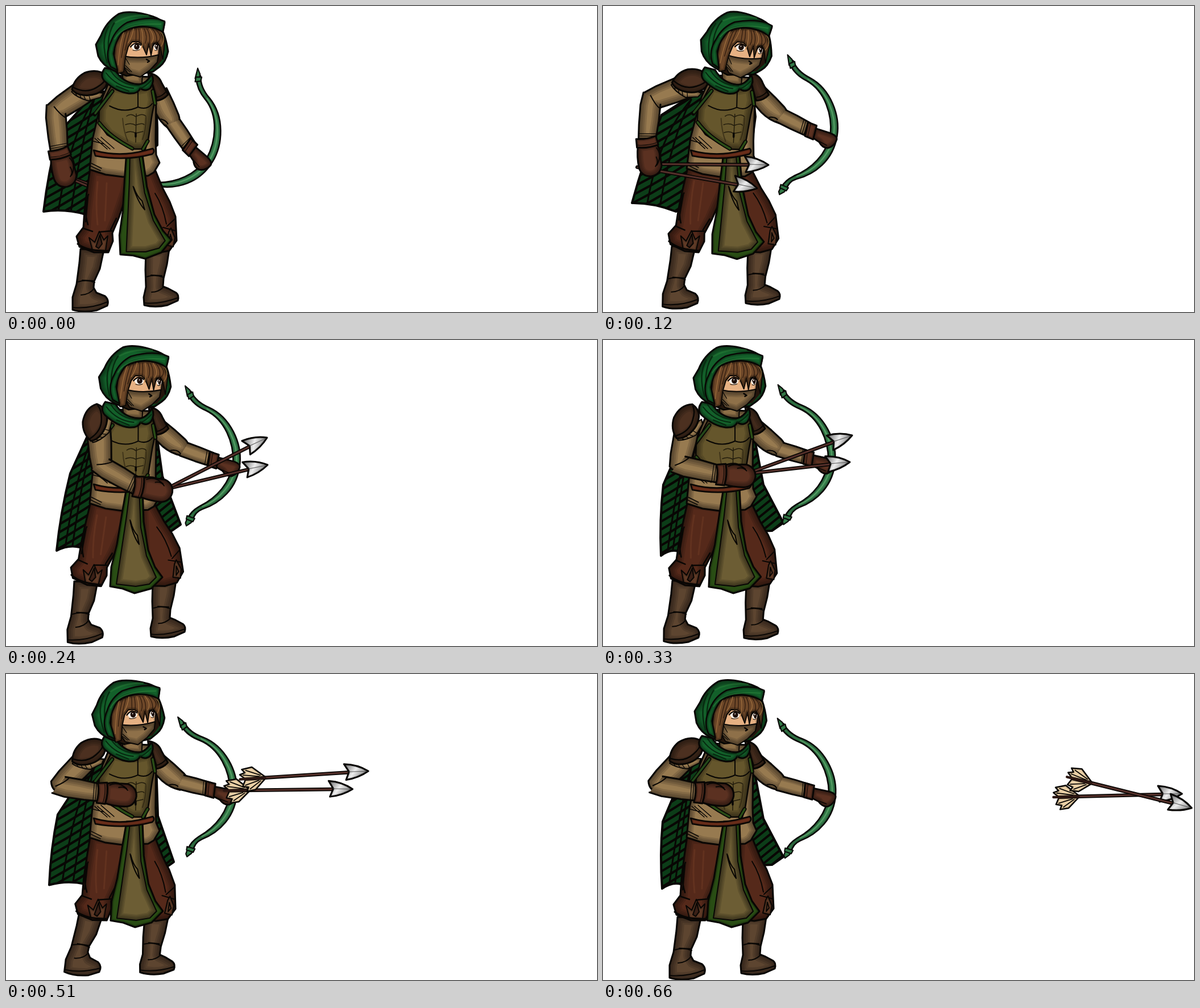
These frames come from a looping animation (1039 px wide and 539 px high, 0.9 s). An HTML page with a canvas:

```html
<!DOCTYPE html>
<html lang="en">
<head>
<meta charset="utf-8">
<title>Archer</title>
<style>
html, body { margin: 0; width: 100%; height: 100%; overflow: hidden; background: #fff; }
canvas { display: block; }
</style>
</head>
<body>
<canvas id="stage" width="1039" height="539"></canvas>
<script>
const ctx = document.getElementById('stage').getContext('2d');
const LOOP = 900, STEP = 30, LAST = 660;
const TAN = '#977a50', PANTS = '#55291a', BOOT = '#5d4530', GLOVE = '#5b3121', PAD = '#4c3020';
const GREEN = '#13602a', OLIVE = '#65562c', BROWN = '#6d4728';
const rad = Math.PI / 180;
const cache = {};
const path = d => cache[d] || (cache[d] = new Path2D(d));

// time, head angle, head x, left knee, left foot, right knee, right foot,
// tabard angle, bow angle, grip x, grip y, elbow x, elbow y, lean
const BODY = [
  [0, 0, 0, 0, 0, 0, 0, -6, 30, 357, 277, 294, 206, 0],
  [120, 7.5, 6, -10, -12, 9, 8, -3, 7.5, 407, 233, 314, 194, 1.6],
  [240, 2.3, 3, -11, -9, 12, 12, 0, 3.7, 407, 222, 314, 193, 0.2],
  [330, 1, 0, -9, -10, 6, 5, -1, 1.9, 404, 217, 312, 193, 0],
  [450, 0, -1, -5, -14, 0, -5, -0.8, 0.9, 402, 213, 308, 191, 0],
  [570, -5.5, -7, 0, -12, -4, -9, 0.2, 0, 402, 210, 308, 190, -0.2],
  [660, 2, 1, 0, 0, 0, 0, 0, 1.1, 405, 215, 312, 193, 0]
];
// time, shoulder x, y, upper arm, forearm and glove angles
const ARM = [
  [0, 147, 145, 146, 85, 75], [60, 150, 142, 162, 109, 98], [120, 152, 140, 159, 96, 81],
  [240, 163, 150, 86, 30, 8], [330, 150, 150, 102, 13, 2], [450, 147, 145, 135, 10, 4],
  [570, 146, 147, 135, 10, 4], [660, 147, 145, 135, 10, 4]
];
// time, then tip x, tip y, angle for both arrows
const ARROWS = [
  [0, 278, 374, 23, 284, 361, 19], [60, 258, 300, 10, 246, 340, 17], [120, 291, 280, 0.5, 271, 321, 10],
  [240, 459, 172, -27, 460, 220, -13.4], [330, 438, 168, -20, 434, 215, -6.5],
  [450, 407, 167, -13, 400, 212, 0], [540, 752, 173, 1, 714, 198, -1],
  [570, 845, 177, 4.5, 808, 194, -1.5], [660, 1035, 236, 14, 1018, 211, -1.5]
];
// time, then left bulge, left corner, hem, right bulge, right corner
const CAPE = [
  [0, 92, 225, 66, 362, 140, 367, 266, 215, 266, 245],
  [60, 85, 212, 47, 352, 132, 364, 267, 205, 264, 243],
  [120, 103, 192, 51, 347, 128, 362, 268, 195, 262, 240],
  [240, 113, 235, 89, 371, 130, 365, 275, 240, 307, 325],
  [330, 106, 255, 102, 380, 132, 372, 282, 255, 317, 322],
  [450, 92, 245, 79, 373, 137, 370, 268, 250, 298, 330],
  [570, 90, 250, 73, 370, 142, 370, 266, 250, 292, 332],
  [660, 105, 260, 104, 378, 137, 370, 282, 255, 317, 322]
];

function pose(rows, t) {
  let i = 1;
  while (i < rows.length - 1 && rows[i][0] < t) i++;
  const a = rows[i - 1], b = rows[i], u = (t - a[0]) / (b[0] - a[0]);
  return a.map((v, n) => v + (b[n] - v) * u).slice(1);
}

function at(x, y, deg, draw, px = 0, py = 0) {
  ctx.save();
  ctx.translate(x, y);
  ctx.rotate(deg * rad);
  ctx.translate(-px, -py);
  draw();
  ctx.restore();
}

// Filled shape with soft dark edges and an ink outline
function ink(d, fill, width = 3, depth = 26) {
  const p = typeof d === 'string' ? path(d) : d;
  ctx.fillStyle = fill;
  ctx.fill(p);
  ctx.save();
  ctx.clip(p);
  ctx.strokeStyle = 'rgba(0,0,0,.13)';
  for (let w = depth; w > 4; w -= depth / 4) { ctx.lineWidth = w; ctx.stroke(p); }
  ctx.restore();
  line(p, width);
}

function line(d, width = 2, color = '#080604') {
  ctx.strokeStyle = color;
  ctx.lineWidth = width;
  ctx.stroke(typeof d === 'string' ? path(d) : d);
}

function cape(t) {
  const [ax, ay, bx, by, cx, cy, dx, dy, ex, ey] = pose(CAPE, t);
  const p = new Path2D(`M165 150L145 165L${ax} ${ay}Q${(ax + bx) / 2 - 5} ${(ay + by) / 2} ${bx} ${by}` +
    `Q${(bx + cx) / 2} ${(by + cy) / 2 - 8} ${cx} ${cy}L200 340L${ex - 20} ${ey + 14}L${ex} ${ey}L${dx} ${dy}L264 160Z`);
  ctx.fillStyle = '#0c3d18';
  ctx.fill(p);
  ctx.save();
  ctx.clip(p);
  for (let y = 190; y < 520; y += 14) line(`M30 ${y}Q110 ${y - 38} 190 ${y - 95}M250 ${y - 40}L330 ${y - 105}`, 4);
  for (const u of [0.35, 0.65]) {
    const x = bx + (cx - bx) * u;
    line(new Path2D(`M155 165Q${x + 20} 230 ${x} ${by}`), 3);
  }
  ctx.restore();
  line(p, 4);
}

function arrow(x, y, deg, feathers) {
  at(x, y, deg, () => {
    line('M-214 0L-34 0', 6.5);
    line('M-213 0L-34 0', 3, '#55302a');
    if (feathers) {
      ink('M-182 -2L-204 -20L-222 -17L-217 -11L-226 -8L-218 -1Z', '#e9cfa5', 2.5, 5);
      ink('M-182 2L-200 20L-215 22L-212 15L-222 13L-217 2Z', '#e9cfa5', 2.5, 5);
      line('M-190 -5L-215 -15M-192 -3L-220 -7M-190 5L-209 18M-193 4L-217 11', 1.8);
      line('M-226 0L-182 0', 4.5, '#2c1712');
    }
    const g = ctx.createLinearGradient(-42, -14, -8, 12);
    g.addColorStop(0, '#666');
    g.addColorStop(0.5, '#eee');
    g.addColorStop(1, '#777');
    ink('M0 0Q-18 -13 -42 -15L-34 -1L-40 13Q-18 11 0 0Z', g, 3, 5);
    line('M-3 0L-34 -1', 1, '#555');
  });
}

function arrows(t) {
  const [ax, ay, aa, bx, by, ba] = pose(ARROWS, t);
  arrow(bx, by, ba, t > 450);
  arrow(ax, ay, aa, t > 450);
}

function backArm(b) {
  const [bowA, gx, gy, ex, ey, lean] = b.slice(7);
  const a = bowA * rad, c = Math.cos(a), s = Math.sin(a);
  const wx = gx - 44 * c + 8 * s, wy = gy - 44 * s - 8 * c;
  const sx = 270 + lean * 4, sy = 160;
  at(sx, sy, Math.atan2(ey - sy, ex - sx) / rad, () => {
    ink('M-8 -18L20 -17L44 -15Q60 -12 62 0L56 12Q40 20 20 19L-5 16Z', TAN);
    line('M36 16Q46 5 56 12', 2);
  });
  at(ex, ey, Math.atan2(wy - ey, wx - ex) / rad, () => {
    ink('M2 -13L24 -13L50 -12L50 12L24 13L-4 13', TAN, 3, 16);
    line('M38 -11L42 11M42 -11L46 11M46 -11L49 6', 1.2);
  });
  at(sx, sy, lean, () => {
    ink('M250 118Q268 120 274 136L285 156Q276 166 264 167L254 150Z', PAD);
    line('M264 161Q275 159 282 150', 2);
  }, 270, 160);
  at(gx, gy, bowA, () => {
    ink('M312 84Q322 102 345 110C385 125 407 170 406 205C405 250 375 278 345 290Q332 296 330 310' +
      'L321 307Q325 295 340 285C370 268 391 240 394 205C393 170 375 130 340 116Q318 108 308 92Z', '#347c49', 2.5, 7);
    line('M342 113C380 130 400 170 400 204C398 244 372 272 345 285', 2, 'rgba(115,185,125,.55)');
    ink('M301 75L310 82L313 90L306 93Z', '#347c49', 2, 5);
    ink('M306 90L315 85L317 92L309 98Z', '#347c49', 2, 5);
    ink('M320 306L330 309L327 315L319 321L317 316Z', '#347c49', 2, 5);
    ink('M319 303L333 307L330 313L318 309Z', '#347c49', 2, 5);
    ink('M366 197L388 201Q407 204 406 212Q404 223 394 228Q384 231 376 220L364 214Z', GLOVE, 3, 16);
    line('M376 219L390 224', 1.5);
    ink('M352 188L368 192L365 217L350 213Z', GLOVE, 3, 8);
    line('M357 191L355 214', 1);
  }, 402, 210);
}

function leg(right, knee, foot) {
  const kx = right ? 268 : 155, hx = right ? 258 : 175;
  const lift = right ? -Math.max(foot, 0) * 0.4 : foot * 0.4;
  at(kx + knee, 430 + lift, (knee - foot) / 90 / rad, () => {
    if (right) {
      ink('M246 428L245 465L246 495L242 513L243 527Q262 532 284 527L302 519Q305 510 299 505L286 498L276 494L277 480L283 455L287 428Z', BOOT);
      line('M247 477Q262 472 277 478M255 474L274 475M256 504Q268 504 277 495M243 523Q270 526 302 514', 2);
    } else {
      ink('M131 428L129 452L124 490L117 513L117 535Q135 541 160 536L178 528Q182 518 174 511L159 505L154 496L155 485L165 463L172 430Z', BOOT);
      line('M126 486Q142 481 156 487M134 483L154 484M132 509Q148 508 155 497M117 531Q148 534 179 521', 2);
    }
  }, kx, 430);
  at(hx, 300, -knee / 115 / rad, () => {
    if (right) {
      ink('M238 285L262 288L276 322L288 345L298 371L300 413L287 431L266 435L242 432L232 380Z', PANTS);
      line('M262 330Q276 352 282 384M298 374L283 388M276 390L298 396', 2);
      ink('M281 421L286 398L290 391L297 408L294 424Z', '#5f3a26', 2, 6);
      line('M287 418L289 402L292 412Z', 2);
    } else {
      ink('M148 285L143 320L138 360L136 390L124 406L129 424L155 434L180 434L188 414L187 400L198 374L213 330L222 290Z', PANTS);
      line('M145 332Q135 355 144 385M144 335L140 380M184 394Q190 382 194 374M137 392L152 397M165 398L187 396', 2.5);
      line('M161 310Q157 350 161 385M177 312L174 378', 3, 'rgba(130,72,45,.3)');
      ink('M152 430L146 408L156 416L164 397L172 412L179 405L175 431Z', '#5f3a26', 2, 6);
      ink('M158 424L165 403L169 419L163 427Z', '#3c2117', 2, 5);
      line('M126 419Q145 433 181 431', 3);
    }
  }, hx, 300);
}

function torso(lean) {
  at(210, 290, lean, () => {
    ink('M186 122L170 160L160 200L152 235L147 288L175 297L205 301L250 299L260 293L270 276L264 262L263 236L264 160L254 125Z', TAN, 3, 22);
    line('M150 277L168 286M149 282L166 290M153 238L172 243M156 233L178 252M161 233L183 252M167 231L190 251', 1.5);
    ink('M186 138L174 162L164 180L163 206L178 227L204 243L222 252L245 252L250 236L257 190L262 165L257 136Q230 152 186 138Z', OLIVE, 2.5, 24);
    line('M187 150L156 191', 7);
    line('M187 150L157 189', 3.5, '#24491a');
    line('M164 206Q182 230 222 251M249 238L241 252M258 150L262 172', 7);
    line('M164 206Q182 230 222 251M249 238L241 252M258 150L262 172', 3.5, '#2a4d16');
    line('M232 150L232 178M182 176Q208 190 232 178Q248 184 257 172', 2);
    line('M229 190L228 240M212 194Q220 188 228 195M210 209Q220 205 228 210M211 223Q220 219 228 224M228 195Q240 188 246 194M228 210Q240 205 243 209M228 224L241 221', 1.5, '#211b0c');
    line('M228 224L228 230', 3.5);
    line('M205 198Q207 222 214 238M246 196Q246 218 240 235', 2, 'rgba(20,15,5,.45)');
  }, 210, 290);
}

function tabard(deg) {
  at(228, 265, deg, () => {
    ink('M212 260L204 305L195 360L185 400L183 434L205 438L226 446L255 438L275 418L262 400L250 370L242 320L240 260Z', '#294d14', 3, 8);
    ink('M218 262L212 310L203 370L194 430L228 434L252 430L264 418L247 380L237 330L234 262Z', '#6c5d34', 2, 20);
    line('M218 317Q223 345 234 360L231 344Q223 336 219 319', 2);
  }, 228, 265);
  ink('M154 254Q200 267 246 254L258 251Q263 256 257 261Q210 274 157 264Z', '#6b2e1a', 2.5, 6);
}

function frontArm(t) {
  const [sx, sy, up, fore, hand] = pose(ARM, t);
  const ex = sx + 72 * Math.cos(up * rad), ey = sy + 72 * Math.sin(up * rad);
  const wx = ex + 73 * Math.cos(fore * rad), wy = ey + 73 * Math.sin(fore * rad);
  at(sx, sy, up, () => ink('M0 -20L30 -20L62 -18L80 -12Q90 4 78 17L55 20L0 22Z', TAN));
  at(ex, ey, fore, () => {
    ink('M6 -17L35 -17L72 -15L72 15L45 17L10 18L-12 15', TAN);
    line('M-8 2Q6 -7 12 -15', 2);
    line('M58 -15L61 15M62 -15L65 14M66 -15L69 14', 1.2);
  });
  at(wx, wy, hand, () => {
    ink('M6 -16Q20 -22 30 -19L46 -19Q62 -14 62 2Q60 19 44 21Q24 22 6 17Z', GLOVE, 3, 20);
    line('M14 -15Q28 -23 44 -11M30 -12Q40 -15 46 -8', 2);
    ink('M-7 -17L9 -19Q13 0 8 19L-7 18Q-3 0 -7 -17Z', GLOVE, 3, 8);
    line('M5 -16Q8 0 4 17', 1);
  });
  at(sx, sy, up - 135, () => {
    ink('M-30 12Q-20 20 2 22L22 12L25 4L-24 4Z', TAN, 2, 8);
    line('M-24 11L-20 17M-16 12L-12 19M-8 14L-4 20M2 14L5 20', 1.3);
    ink('M-30 8Q-30 -12 -14 -25Q8 -38 26 -27Q31 -14 25 -4Q14 12 -9 14Q-22 15 -30 8Z', PAD, 3, 24);
    line('M-28 4Q-4 11 12 -4Q24 -14 25 -24', 2.5);
  });
}

function collar(lean) {
  at(210, 290, lean, () => {
    ink('M204 108L240 112L239 138L206 136Z', '#8d6f47', 2, 14);
    ink('M174 109Q164 122 173 132Q195 152 216 154Q232 155 236 145Q246 152 254 144Q262 132 256 120Q246 138 232 138Q206 136 192 113Z', GREEN, 3, 12);
    line('M176 118Q194 142 224 145M184 114Q200 140 234 140M236 145Q246 142 255 131M194 141L216 150', 2, '#06270f');
  }, 210, 290);
}

function head(deg, dx) {
  at(225 + dx, 125, deg, () => {
    ink('M198 14Q212 8 238 13Q262 18 272 25L279 29L276 45Q282 60 285 80Q281 99 270 107L258 116L212 123L188 113Q170 105 162 88L158 68L167 52Q176 28 198 14Z', GREEN, 3, 20);
    line('M180 36Q166 62 178 100M190 30Q172 60 186 106', 2.5, '#072b10');
    ctx.fillStyle = '#24150c';
    ctx.fill(path('M204 45L190 75L193 102L203 118L214 122L262 110L274 96L279 78L272 48Q240 30 204 45Z'));
    ink('M207 62L270 60L268 89Q240 95 208 91Z', '#e6b183', 1.5, 6);
    ink('M206 88Q235 94 268 86L266 99L253 113L236 125L214 119L206 106Z', '#8e7049', 2, 20);
    line('M247 94L252 97L249 99', 2.5);
    line('M209 90L217 103M207 107L218 116M210 105L221 116', 1.2);
    for (const [x, r] of [[229, 8], [264, 4.5]]) {
      ctx.fillStyle = '#f7f3ec';
      ctx.beginPath(); ctx.ellipse(x, 72, r, 6, 0, 0, 7); ctx.fill();
      ctx.fillStyle = '#1d0f0b';
      ctx.beginPath(); ctx.ellipse(x + 1, 71.5, r * 0.6, 5.4, 0, 0, 7); ctx.fill();
      ctx.fillStyle = '#fff';
      ctx.fillRect(x - 1, 69, 2, 2);
      line(`M${x - r - 2} 72Q${x - 1} 61 ${x + r} 69`, 2.2);
      line(`M${x - r + 2} 78Q${x} 80 ${x + r - 2} 77`, 1);
    }
    ink('M203 48Q238 28 272 44L279 62L276 94L271 72L266 64L259 66L255 87L251 67L247 86L239 68L233 63L222 63L215 72L210 90L207 116L197 119L190 92L192 68Z', BROWN, 1.8, 9);
    for (let i = 0; i < 13; i++) {
      const x = 210 + i * 4.7, end = i < 4 ? 104 - i * 13 : 62 + (i * 7) % 15;
      const endX = i < 4 ? 197 + i * 6 : x + (i - 5) * 0.9;
      line(`M${x} 40Q${x - (4 - i) * 2.2} 54 ${endX} ${end}`, 1.2, i % 3 ? '#2b190e' : '#a0703f');
    }
    ink('M185 62Q193 40 213 29Q244 19 268 23L279 27Q278 38 275 46Q264 37 240 36Q216 36 203 48Q192 62 189 84L196 113L184 107Q173 86 185 62Z', GREEN, 2.5, 9);
    line('M191 58Q207 29 272 32', 2, 'rgba(50,140,65,.5)');
    line('M193 29Q215 15 250 17', 3, 'rgba(45,135,60,.4)');
  }, 225, 125);
}

function draw(t) {
  const b = pose(BODY, t), lean = b[12];
  ctx.fillStyle = '#fff';
  ctx.fillRect(0, 0, 1039, 539);
  ctx.lineJoin = ctx.lineCap = 'round';
  const stowed = t < 60;
  cape(t);
  if (stowed) arrows(t);
  backArm(b);
  leg(true, b[4], b[5]);
  leg(false, b[2], b[3]);
  torso(lean);
  tabard(b[6]);
  if (!stowed) arrows(t);
  frontArm(t);
  collar(lean);
  head(b[0], b[1]);
}

const start = performance.now();
function tick() {
  const t = (performance.now() - start) % LOOP;
  draw(Math.min(Math.floor(t / STEP) * STEP, LAST));
  requestAnimationFrame(tick);
}
tick();
</script>
</body>
</html>
```
